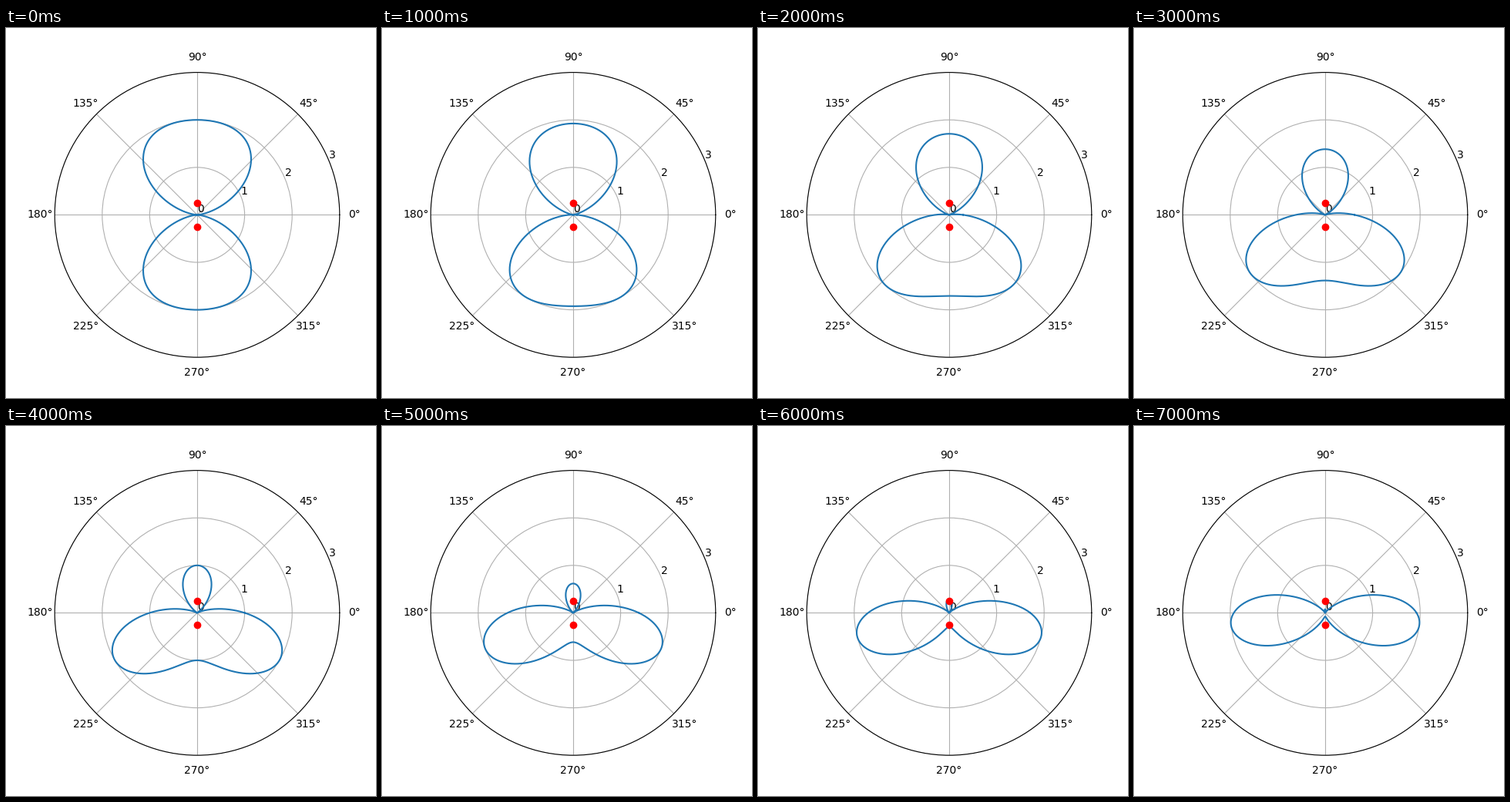
Recreate the animation shown at these times as a matplotlib script. Size 480 px wide and 480 px high, loop 8 s.

```python
import numpy as np
import matplotlib.pyplot as plt
from matplotlib.animation import FuncAnimation

SIZE = 480
FRAMES = 8
SPACING = 0.5                # source distance in wavelengths
CENTER_X, RADIUS = 248, 184.8

theta = np.linspace(0, 2 * np.pi, 721)


def intensity(phase):
    """Interference pattern of two point sources on the vertical axis."""
    return 1 + np.cos(2 * np.pi * SPACING * np.sin(theta) + phase)


fig = plt.figure(figsize=(SIZE / 100, SIZE / 100), dpi=100)
side = 2 * RADIUS / SIZE
ax = fig.add_axes([(CENTER_X - RADIUS) / SIZE, 0.11, side, side],
                  projection="polar")

curve, = ax.plot(theta, intensity(np.pi), color="tab:blue", lw=1.5)
ax.plot([np.pi / 2, 3 * np.pi / 2], [SPACING / 2] * 2, "ro", ms=6)
ax.set_ylim(0, 3)
ax.set_yticks([0, 1, 2, 3])


def update(i):
    curve.set_ydata(intensity(np.pi * (1 - i / FRAMES)))
    return curve,


anim = FuncAnimation(fig, update, frames=FRAMES, interval=1000, repeat=True,
                     repeat_delay=0)
plt.show()
```
